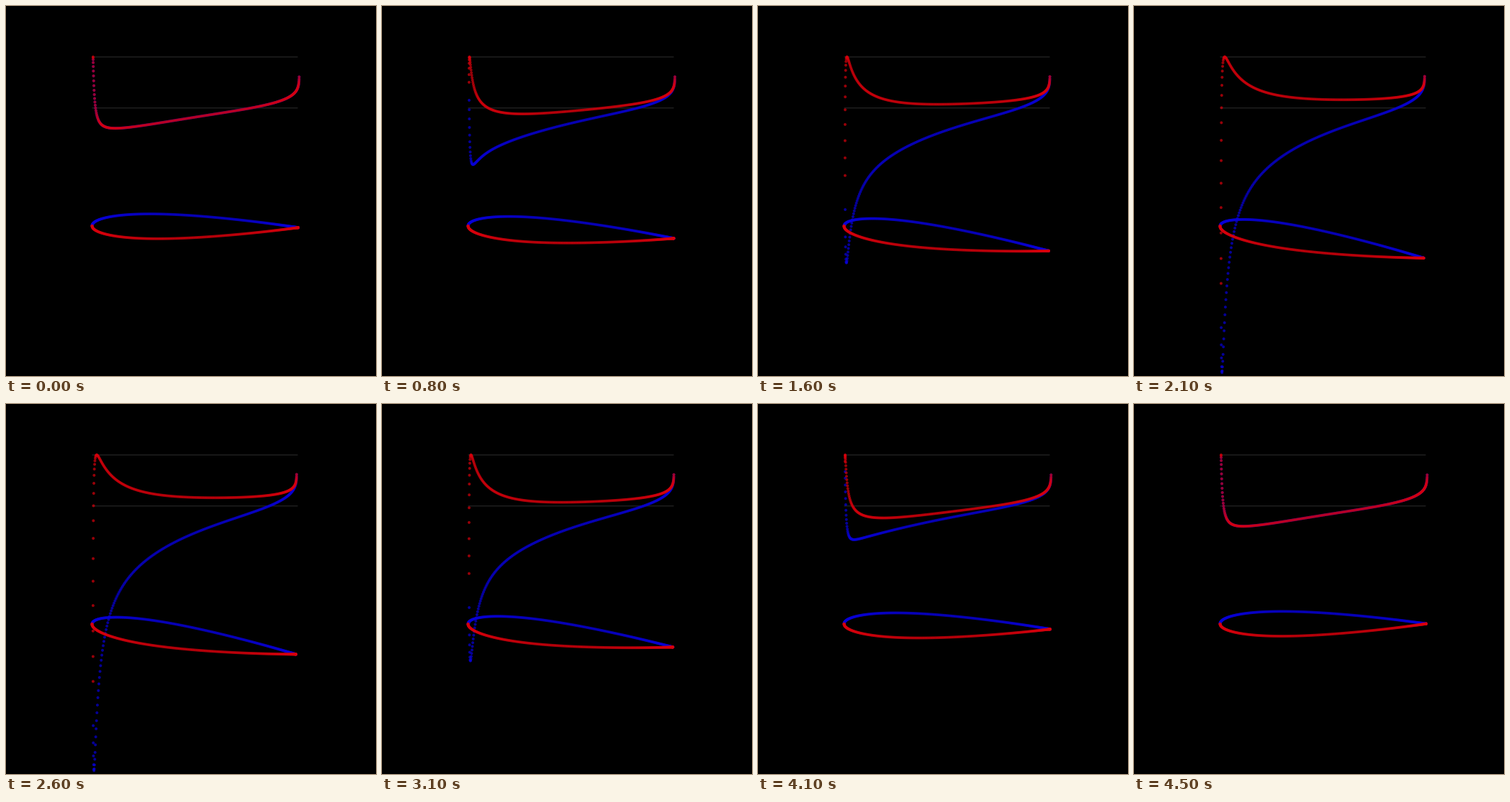
A matplotlib script for the animation above (4.6 s loop, 518x518 px).

```python
import numpy as np
import matplotlib.pyplot as plt
from matplotlib.animation import FuncAnimation

SIZE, DPI = 518, 64
FRAMES, INTERVAL = 46, 100
SIDE = 200                      # panels per surface
X0, Y0, CHORD = 120.0, 307.2, 288.6
CP_ZERO, CP_UNIT, CP_SHIFT = 142.3, 71.5, 1.4
RED, BLUE, GREY = "#d8000c", "#0800d8", "#2a2a2a"

# Redraw progress: odd = foil turned and pressure pending, even = both updated
TICKS = [0, 6, 8, 26, 31, 37, 45]
STAGES = [1, 11, 13, 45, 54, 67, 80]


def naca0012(n):
    """Nodes from the trailing edge along the lower side and back on top."""
    theta = np.linspace(-np.pi, np.pi, 2 * n + 1)
    x = (1 - np.cos(theta)) / 2
    y = 0.6 * (0.2969 * np.sqrt(x) - 0.126 * x - 0.3516 * x**2
               + 0.2843 * x**3 - 0.1036 * x**4)
    y[[0, -1]] = 0
    return x + 1j * np.sign(theta) * y


def surface_speed(z):
    """Hess-Smith panels: nodal speed for unit streams along x and y."""
    a, b = z[:-1], z[1:]
    mid, turn = (a + b) / 2, (b - a) / abs(b - a)
    with np.errstate(all="ignore"):
        log = np.log((mid[:, None] - a) / (mid[:, None] - b))
    np.fill_diagonal(log, -1j * np.pi)
    w = log * turn[:, None] / turn / (2 * np.pi)
    swirl = 1j * w.sum(axis=1)
    stream = np.stack([turn, -1j * turn], axis=1)

    n = len(mid)
    lhs = np.zeros((n + 1, n + 1))
    lhs[:n, :n], lhs[:n, n] = -w.imag, -swirl.imag
    lhs[n, :n] = w.real[0] + w.real[-1]
    lhs[n, n] = swirl.real[0] + swirl.real[-1]
    rhs = np.vstack([stream.imag, -(stream.real[0] + stream.real[-1])])
    sol = np.linalg.solve(lhs, rhs)
    speed = w.real @ sol[:n] + np.outer(swirl.real, sol[n]) + stream.real

    # Mild slowdown that grows toward the trailing edge
    x = z.real[1:-1, None]
    loss = (1 - x) ** 0.016 * (1 - 0.012 * np.sqrt(x))
    return loss * (speed[:-1] + speed[1:]) / 2


foil = naca0012(SIDE)
speed = surface_speed(foil)
lower, upper = slice(0, SIDE + 1), slice(SIDE + 1, None)


def incidence(step):
    """Half-degree steps from 0 up to 10 degrees and back."""
    return np.radians(min(step, 40 - step) / 2)


def place(alpha):
    z = foil * np.exp(-1j * alpha)
    return np.column_stack([X0 + CHORD * z.real, Y0 - CHORD * z.imag])


def pressure(alpha):
    cp = 1 - (speed @ [np.cos(alpha), np.sin(alpha)]) ** 2
    x = place(alpha)[1:-1, 0] + CP_SHIFT
    points = np.column_stack([x, CP_ZERO - CP_UNIT * cp])
    # The first upper node and the outermost tail nodes stay undrawn
    return points[SIDE + 1:-1], points[1:SIDE]


def scene(i):
    stage = int(np.interp(i, TICKS, STAGES) + 0.5)
    shape = place(incidence((stage + 1) // 2))
    cp_up, cp_low = pressure(incidence(stage // 2))
    return [cp_up, cp_low, shape[upper], shape[lower]]


fig = plt.figure(figsize=(SIZE / DPI, SIZE / DPI), dpi=DPI, facecolor="black")
ax = fig.add_axes([0, 0, 1, 1])
ax.set(xlim=(-0.5, SIZE - 0.5), ylim=(SIZE - 0.5, -0.5))
ax.axis("off")
for y in (CP_ZERO - CP_UNIT, CP_ZERO):
    ax.plot([120, 408], [y, y], color=GREY, lw=1.1 * 72 / DPI,
            solid_capstyle="butt", snap=False, zorder=1)

parts = scene(0)
colors = [c for part, c in zip(parts, [BLUE, RED] * 2) for _ in part]
dots = ax.scatter(*np.vstack(parts).T, s=(4.0 * 72 / DPI) ** 2, c=colors,
                  alpha=0.7, linewidths=0, zorder=2)


def update(i):
    dots.set_offsets(np.vstack(scene(i)))
    return [dots]


anim = FuncAnimation(fig, update, frames=FRAMES, interval=INTERVAL,
                     repeat=True, repeat_delay=0, blit=False)
plt.show()
```
